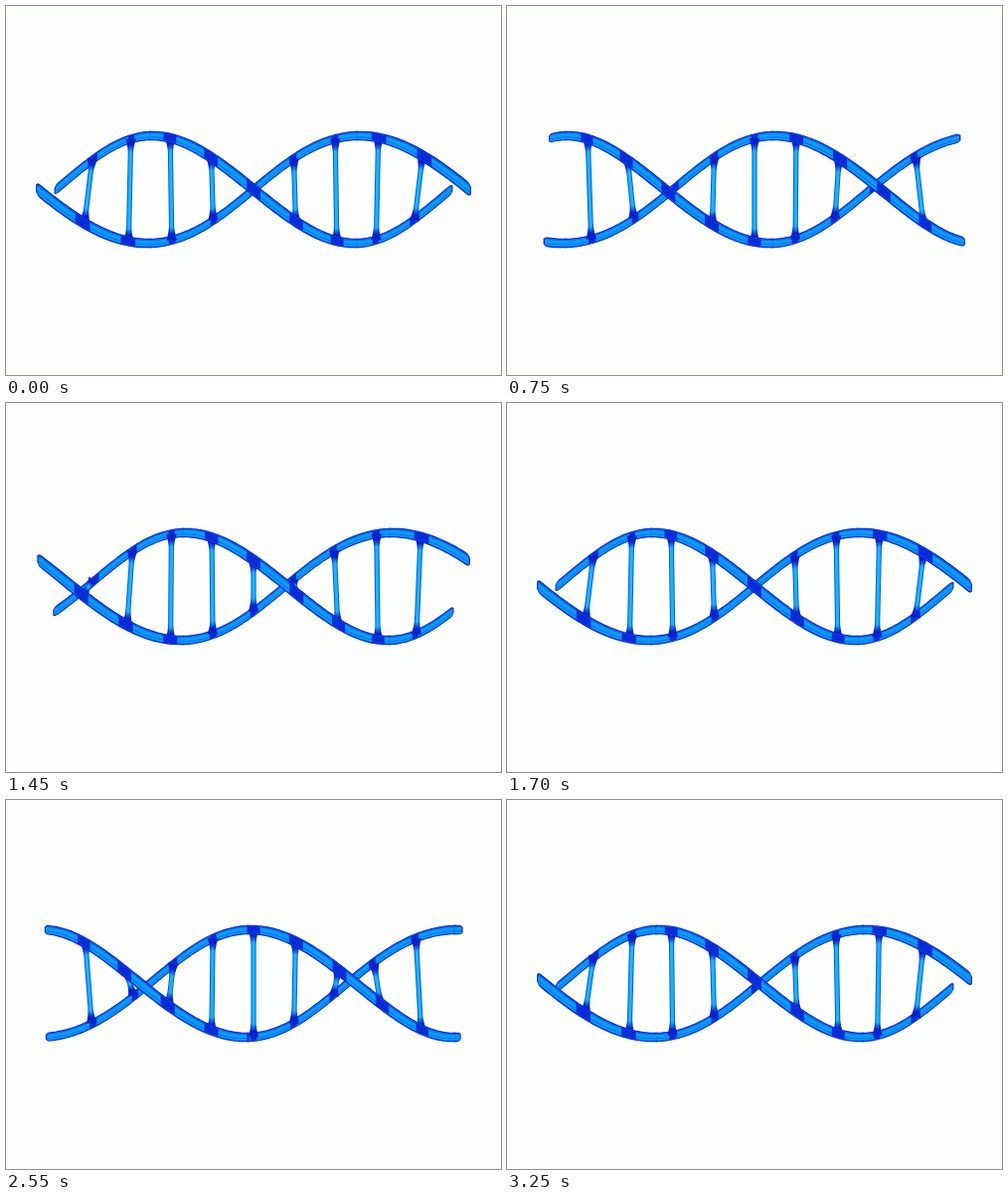
Write an HTML page with a canvas that moves like this. It is 498x371 px and loops after 3.3 s.

```html
<!DOCTYPE html>
<html lang="en">
<head>
<meta charset="utf-8">
<title>Double helix</title>
<style>
  html, body { margin: 0; width: 100%; height: 100%; overflow: hidden; background: #fdfffc; }
  canvas { display: block; width: 498px; height: 371px; }
</style>
</head>
<body>
<canvas id="stage" width="498" height="371"></canvas>
<script>
const ctx = document.getElementById('stage').getContext('2d');
const LOOP = 3300, STEP = 50;
const TURN = Math.PI * 2;
const CX = 249, CY = 184.5, HALF = 208, RADIUS = 54;
const DEPTH = 0.044, RUNG_DEPTH = 0.029, RUNG_GAP = 41.5;
const START = -0.004, END = 1.004;
const DARK = '#0a22cc', BLUE = '#0668ee', CYAN = '#0a9cf8', LIGHT = '#14b8fc', JOINT = '#082cd8';

// time in ms, rotation in degrees
const SPIN = [[0, 0], [750, 74.5], [1150, 117], [1700, 180], [2200, 237], [2850, 307], [3250, 355.5], [3300, 360]];

function spinAt(t) {
  const i = SPIN.findIndex(s => s[0] > t);
  const [t0, a0] = SPIN[i - 1], [t1, a1] = SPIN[i];
  return (a0 + (a1 - a0) * (t - t0) / (t1 - t0)) * TURN / 360;
}

// u runs from 0 to 1 along the axis
function point(u, phase, depth = DEPTH) {
  const a = phase + u * TURN;
  const z = Math.cos(a);
  const slope = RADIUS * z * TURN / (2 * HALF);
  const toEnd = Math.min(u - START, END - u);
  const round = 0.55 + 0.45 * Math.sqrt(Math.min(1, Math.max(0, toEnd) / 0.007));
  return {
    x: CX + (u * 2 - 1) * HALF * (1 + depth * z),
    y: CY + RADIUS * Math.sin(a) * (1 + DEPTH * z * 0.7),
    h: (9.5 + 1.3 * z) / 2 * Math.hypot(1, slope) * round
  };
}

// fills the strip between two heights (-1..1) across the strand
function strip(phase, u0, u1, top, bottom, color) {
  if (u1 <= u0) return;
  const n = Math.max(3, Math.ceil((u1 - u0) * 200));
  const pts = Array.from({ length: n + 1 }, (_, i) => point(u0 + (u1 - u0) * i / n, phase));
  ctx.beginPath();
  for (const p of pts) ctx.lineTo(p.x, p.y + p.h * top);
  for (const p of pts.reverse()) ctx.lineTo(p.x, p.y + p.h * bottom);
  ctx.closePath();
  ctx.fillStyle = color;
  ctx.fill();
}

// ranges of u where the strand lies in front of or behind the axis
function ranges(phase, front) {
  const out = [];
  for (let k = -2; k < 6; k++) {
    if ((k % 2 === 0) !== front) continue;
    const a = k * Math.PI - Math.PI / 2;
    const u0 = Math.max(START, (a - phase) / TURN);
    const u1 = Math.min(END, (a + Math.PI - phase) / TURN);
    if (u1 > u0) out.push([u0, u1]);
  }
  return out;
}

const rungs = Array.from({ length: 9 }, (_, i) => 0.5 + (i - 4) * RUNG_GAP / (2 * HALF));

function strand(phase, front) {
  for (const [a, b] of ranges(phase, front)) {
    const lo = Math.max(START, a - 0.002), hi = Math.min(END, b + 0.002);
    const c0 = Math.max(lo, START + 0.003), c1 = Math.min(hi, END - 0.003);
    strip(phase, lo, hi, -1, 1, DARK);
    strip(phase, c0, c1, -0.8, 0.8, BLUE);
    strip(phase, c0, c1, -0.5, 0.7, CYAN);
    strip(phase, c0, c1, 0.22, 0.38, BLUE);
    const size = front ? 0.016 : 0.008;
    for (const u of rungs) {
      strip(phase, Math.max(c0, u - size), Math.min(c1, u + size), -0.75, 0.75, JOINT);
    }
  }
}

function rung(u, phase) {
  const a = point(u, phase, RUNG_DEPTH), b = point(u, phase + Math.PI, RUNG_DEPTH);
  const len = Math.hypot(b.x - a.x, b.y - a.y);
  if (len < 12) return;
  const flare = Math.min(15, len / 2);
  const shape = (end, mid) => {
    ctx.beginPath();
    ctx.moveTo(-end, 0);
    ctx.quadraticCurveTo(-mid, flare * 0.6, -mid, flare);
    ctx.lineTo(-mid, len - flare);
    ctx.quadraticCurveTo(-mid, len - flare * 0.6, -end, len);
    ctx.lineTo(end, len);
    ctx.quadraticCurveTo(mid, len - flare * 0.6, mid, len - flare);
    ctx.lineTo(mid, flare);
    ctx.quadraticCurveTo(mid, flare * 0.6, end, 0);
    ctx.closePath();
  };
  const paint = core => {
    const fade = Math.min(0.35, 10 / len);
    const g = ctx.createLinearGradient(0, 0, 0, len);
    g.addColorStop(0, DARK);
    g.addColorStop(fade * 0.6, DARK);
    g.addColorStop(fade * 1.3, core);
    g.addColorStop(1 - fade * 1.3, core);
    g.addColorStop(1 - fade * 0.6, DARK);
    g.addColorStop(1, DARK);
    ctx.fillStyle = g;
    ctx.fill();
  };
  ctx.save();
  ctx.translate(a.x, a.y);
  ctx.rotate(Math.atan2(b.y - a.y, b.x - a.x) - Math.PI / 2);
  shape(5.2, 2.6);
  paint('#0858e0');
  shape(2.2, 1.6);
  paint(LIGHT);
  ctx.restore();
}

function draw(t) {
  const phase = spinAt(t);
  ctx.fillStyle = '#fdfffc';
  ctx.fillRect(0, 0, 498, 371);
  strand(phase, false);
  strand(phase + Math.PI, false);
  for (const u of rungs) rung(u, phase);
  strand(phase, true);
  strand(phase + Math.PI, true);
}

const start = performance.now();
function tick() {
  const t = (performance.now() - start) % LOOP;
  draw(Math.floor(t / STEP) * STEP);
  requestAnimationFrame(tick);
}
tick();
</script>
</body>
</html>
```
